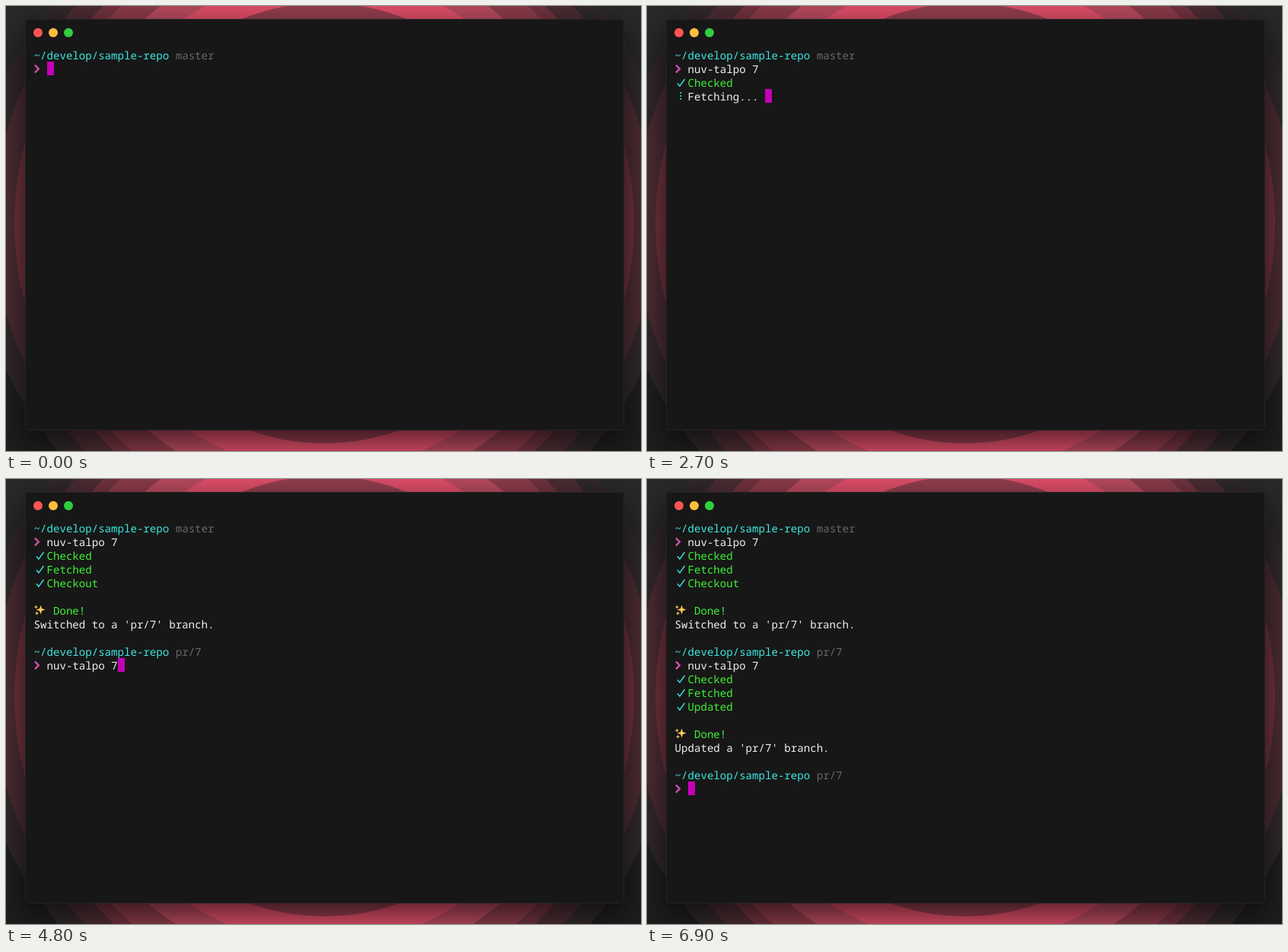
An HTML page with a canvas for the animation above (7200 ms loop, 834 px wide and 584 px high).

```html
<!DOCTYPE html>
<html lang="en">
<head>
<meta charset="utf-8">
<title>Terminal session</title>
<style>
html, body { margin: 0; width: 100%; height: 100%; overflow: hidden; background: #1c1c1c; }
canvas { display: block; }
</style>
</head>
<body>
<canvas id="stage" width="834" height="584"></canvas>
<script>
const W = 834, H = 584, LOOP = 7200, TICK = 300;
const LEFT = 36.6, CELL = 8.46, LINE = 18;
const COMMAND = 'nuv-talpo 7';
const CYAN = '#3ee6df', GREEN = '#3ff238', WHITE = '#f0f0f0', GRAY = '#696969';
const MAGENTA = '#c400b6', PINK = '#d44fae', GOLD = '#ffc857';
const SPINNER = '⠋⠙⠹⠸⠼⠴⠦⠧⠇⠏';

const ctx = document.getElementById('stage').getContext('2d');
const backdrop = makeBackdrop();

function circle(c, x, y, r, fill) {
  c.fillStyle = fill;
  c.beginPath();
  c.arc(x, y, r, 0, Math.PI * 2);
  c.fill();
}

function makeBackdrop() {
  const layer = document.createElement('canvas');
  layer.width = W;
  layer.height = H;
  const c = layer.getContext('2d');
  const base = c.createLinearGradient(0, 0, 0, H);
  base.addColorStop(0, '#292929');
  base.addColorStop(1, '#1d1d1d');
  c.fillStyle = base;
  c.fillRect(0, 0, W, H);

  const rings = [
    [460, '#30282a'], [434, '#4b2c33'], [407, '#70323e'],
    [391, '#8c3b49'], [357, '#b84a5e'], [325, '#e04e69'], [289, '#943e4e']
  ];
  for (const [r, fill] of rings) circle(c, 418, 285, r, fill);

  // Soft shadow, then the window with its thin edge
  c.save();
  c.shadowColor = 'rgba(0,0,0,.68)';
  c.shadowBlur = 42;
  c.shadowOffsetY = 13;
  c.fillStyle = '#171717';
  c.beginPath();
  c.roundRect(25, 17, 787, 540, 4);
  c.fill();
  c.restore();
  c.strokeStyle = '#242424';
  c.lineWidth = 1;
  c.beginPath();
  c.roundRect(25.5, 17.5, 786, 539, 4);
  c.stroke();

  ['#ff5553', '#ffbd3f', '#31cf40'].forEach((fill, i) => circle(c, 42 + i * 20, 35, 6, fill));
  return layer;
}

function put(text, col, row, fill) {
  ctx.fillStyle = fill;
  ctx.fillText(text, LEFT + col * CELL, 70 + row * LINE);
}

function cursor(col, row) {
  ctx.fillStyle = MAGENTA;
  ctx.fillRect(Math.round(LEFT + col * CELL), 55 + row * LINE, 9, 18);
}

function polyline(points, row, color, width) {
  ctx.strokeStyle = color;
  ctx.lineWidth = width;
  ctx.beginPath();
  for (const [x, y] of points) ctx.lineTo(x, y + row * LINE);
  ctx.stroke();
}

function prompt(row, branch) {
  put('~/develop/sample-repo', 0, row, CYAN);
  put(branch, 22, row, GRAY);
  polyline([[38, 59.5], [42.8, 64.5], [38, 69.5]], row + 1, PINK, 2.4);
}

function checked(text, row) {
  polyline([[40, 65.5], [43, 69.2], [49.5, 60]], row, CYAN, 1.4);
  put(text, 2, row, GREEN);
}

function star(x, y, r) {
  ctx.fillStyle = GOLD;
  ctx.beginPath();
  for (let i = 0; i < 8; i++) {
    const a = i * Math.PI / 4, d = i % 2 ? r * 0.36 : r;
    ctx.lineTo(x + d * Math.cos(a), y + d * Math.sin(a));
  }
  ctx.fill();
}

function done(message, row) {
  const y = 64 + row * LINE;
  star(45.6, y - 0.5, 6);
  star(39.4, y - 4, 2.7);
  star(40.5, y + 4.3, 2.7);
  put('Done!', 3, row, GREEN);
  put(message, 0, row + 1, WHITE);
}

function busy(text, row, tick) {
  const bits = SPINNER.codePointAt((tick + 4) % SPINNER.length) - 0x2800;
  for (let i = 0; i < 6; i++) {
    if (bits >> i & 1) {
      circle(ctx, i < 3 ? 40.3 : 44.3, 60 + row * LINE + (i % 3) * 4, 1.05, CYAN);
    }
  }
  put(text + '...', 2, row, WHITE);
  cursor(text.length + 6, row);
}

// One command: typing, three steps, then the closing message
function run(row, step, tick, branch, active, result, message) {
  prompt(row, branch);
  const typed = Math.min(COMMAND.length, Math.ceil(Math.max(0, step) * 2.75));
  put(COMMAND.slice(0, typed), 2, row + 1, WHITE);
  if (step < 5) return cursor(2 + typed, row + 1);
  if (step < 7) return busy('Checking', row + 2, tick);
  checked('Checked', row + 2);
  if (step < 10) return busy('Fetching', row + 3, tick);
  checked('Fetched', row + 3);
  if (step < 11) return busy(active, row + 4, tick);
  checked(result, row + 4);
  done(message, row + 6);
}

function frame(now) {
  const tick = Math.floor((now % LOOP) / TICK);
  ctx.drawImage(backdrop, 0, 0);
  ctx.font = '14.1px "Noto Sans Mono", "DejaVu Sans Mono", monospace';
  ctx.textRendering = 'geometricPrecision';
  ctx.textBaseline = 'alphabetic';

  run(0, tick - 1, tick, 'master', 'Checkout', 'Checkout', "Switched to a 'pr/7' branch.");
  if (tick >= 12) {
    run(9, tick - 12, tick, 'pr/7', 'Updating', 'Updated', "Updated a 'pr/7' branch.");
  }
  if (tick >= 23) {
    prompt(18, 'pr/7');
    cursor(2, 19);
  }
  requestAnimationFrame(frame);
}

const start = performance.now();
const tickFrame = frame;
frame = now => tickFrame(Math.max(0, now - start));
requestAnimationFrame(frame);
</script>
</body>
</html>
```
